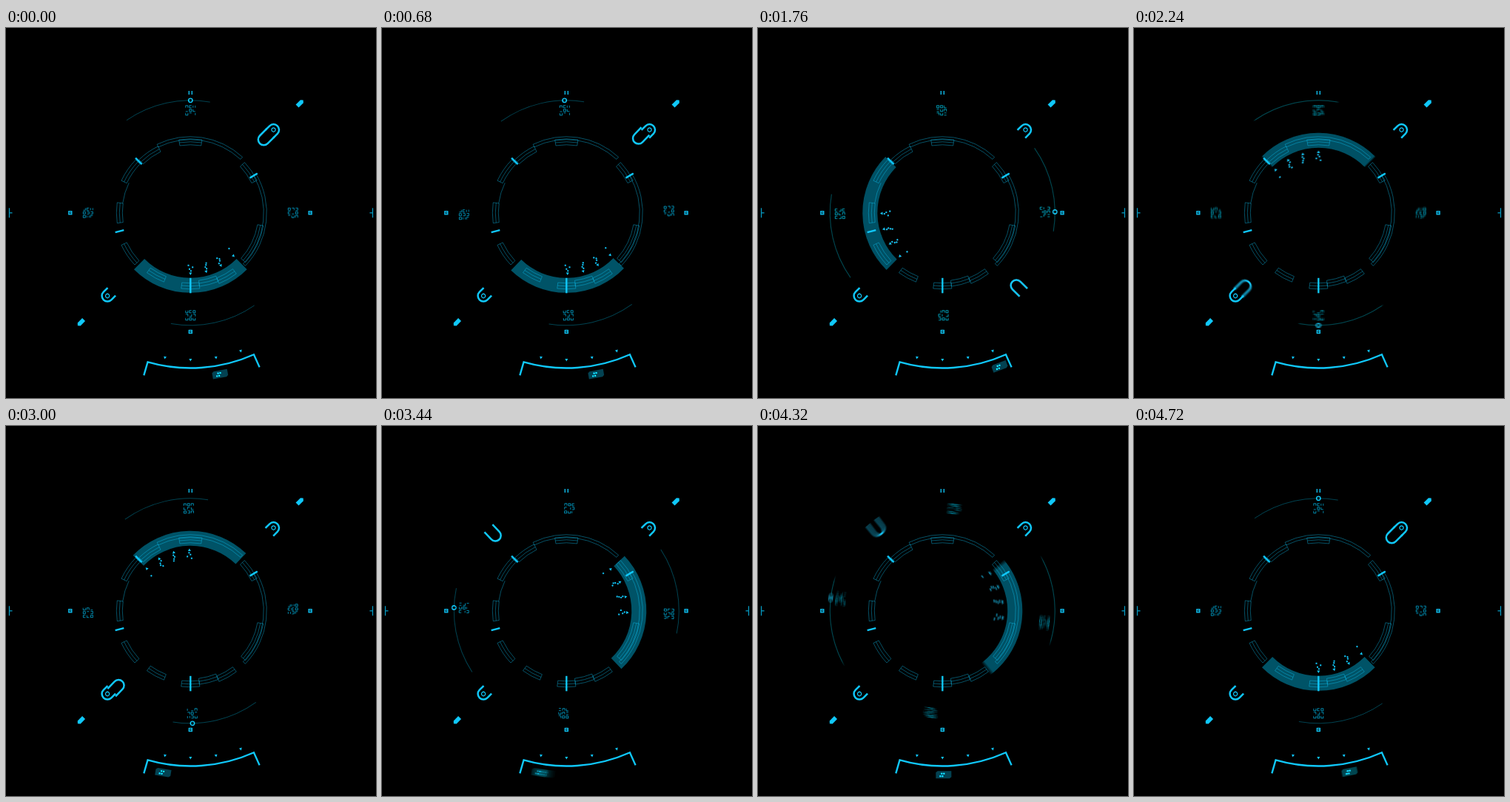
An HTML page with a canvas for the animation above (4760 ms loop, 500 by 500 pixels).

```html
<!DOCTYPE html>
<html>
<head>
<meta charset="utf-8">
<style>
  html, body { margin: 0; background: #000; overflow: hidden; }
  canvas { display: block; }
</style>
</head>
<body>
<canvas id="stage" width="500" height="500"></canvas>
<script>
const ctx = document.getElementById('stage').getContext('2d');
const LOOP = 4760, QUARTER = LOOP / 4, STEP = 40, RAD = Math.PI / 180;
const BRIGHT = '#10c8fb', TEXT = '#007d9e', PANEL = '#005367', THIN = '#00414f';

// Quadratic ease from 0 to 1 between two times
function ease(t, from, to) {
  const u = Math.min(Math.max((t - from) / (to - from), 0), 1);
  return u < 0.5 ? 2 * u * u : 1 - 2 * (1 - u) ** 2;
}

// Four quarter turns, each with a small wind-up and overshoot
const swingStarts = [715, 1905, 3055, 4245];
const dialAngle = t => swingStarts.reduce((sum, s) => sum
  - ease(t, s - 190, s - 100)
  + 92.7 * ease(t, s, s + 370)
  - 1.7 * ease(t, s + 370, s + 475), 0);

// Four stops 10 degrees apart, then back to the first
function badgeAngle(t) {
  let angle = 10.4 - (t > 2250 ? 40 : 0);
  for (let i = 0; i < 4; i++) {
    const s = QUARTER * i + 1045;
    angle += 10.7 * ease(t, s, s + 90) - 0.7 * ease(t, s + 90, s + 145);
  }
  return angle;
}

function random(seed) {
  return () => (seed = seed * 16807 % 2147483647) / 2147483647;
}

function turned(deg, draw) {
  ctx.save();
  ctx.rotate(deg * RAD);
  draw();
  ctx.restore();
}

function line(color, width, ...pts) {
  ctx.strokeStyle = color;
  ctx.lineWidth = width;
  ctx.beginPath();
  pts.forEach(([x, y]) => ctx.lineTo(x, y));
  ctx.stroke();
}

function shape(color, ...pts) {
  ctx.fillStyle = color;
  ctx.beginPath();
  pts.forEach(([x, y]) => ctx.lineTo(x, y));
  ctx.fill();
}

function arc(color, width, r, from, to, x = 0, y = 0) {
  ctx.strokeStyle = color;
  ctx.lineWidth = width;
  ctx.beginPath();
  ctx.arc(x, y, r, from * RAD, to * RAD);
  ctx.stroke();
}

function dot(x, y) {
  ctx.fillStyle = BRIGHT;
  ctx.fillRect(x - 1, y - 1, 2, 2);
}

const arrow = y => shape(BRIGHT, [-2, y - 1.5], [2, y - 1.5], [0, y + 2]);

// U shape with its round end at (0, y); the sign of arm picks the open side
function cup(y, arm) {
  ctx.strokeStyle = BRIGHT;
  ctx.lineWidth = 2.5;
  ctx.beginPath();
  ctx.moveTo(-7.5, y + arm);
  ctx.lineTo(-7.5, y);
  ctx.arc(0, y, 7.5, Math.PI, 0, arm < 0);
  ctx.lineTo(7.5, y + arm);
  ctx.stroke();
}

// 3 x 3 block of tiny broken square characters
function glyphs(seed) {
  const rnd = random(seed);
  for (let i = 0; i < 9; i++) {
    const x = (i % 3) * 5 - 6.5, y = Math.floor(i / 3) * 5 - 145;
    const corners = [[x, y], [x + 3, y], [x + 3, y + 3], [x, y + 3], [x, y]];
    for (let s = 0; s < 4; s++)
      if (rnd() < 0.66) line(TEXT, 1, corners[s], corners[s + 1]);
  }
}

// Fan of dotted columns, each ending in an arrow
function columns() {
  const rnd = random(4242);
  for (let i = 0; i < 4; i++) turned(-15 * i, () => {
    for (let j = 0; j < (i < 3 ? 4 : 1); j++) dot(rnd() * 6 - 3, 71 + 2.5 * j);
    arrow(82.3);
  });
}

function dial() {
  arc(PANEL, 20, 98, 45, 135);
  columns();
  for (const a of [55.4, 235.4]) arc(THIN, 1, 152, a, a + 44.6);
  arc(BRIGHT, 1.3, 2.7, 0, 360, 0, -152);
  for (let i = 0; i < 4; i++) turned(90 * i, () => glyphs(917 + 5381 * i));
  turned(45, () => cup(-140, -13.5));
}

function badge() {
  shape('#034252', [-10.5, -3], [-8, -5], [10.5, -5], [10.5, 3], [8, 5], [-10.5, 5]);
  for (let i = 0; i < 4; i++) dot(3 * (i % 2) - (i < 2 ? 2.5 : 4.5), i < 2 ? -1.5 : 2);
}

// Start and end angles round the ring
const sectors = [[-43, -26], [-31, 44], [10, 42], [53, 68], [68, 83], [83, 97], [111, 126],
  [137, 155], [172, 188], [205, 224], [226, 244], [244, 313], [261, 279]];

function ring() {
  ctx.globalAlpha = 0.4;
  sectors.forEach(([a, b], i) => {
    const long = b - a > 40, outer = i % 2 || long ? 103 : 100;
    const inner = outer - (long ? 4 : 8);
    ctx.strokeStyle = BRIGHT;
    ctx.lineWidth = 1;
    ctx.beginPath();
    ctx.arc(0, 0, inner, a * RAD, b * RAD);
    ctx.arc(0, 0, outer, b * RAD, a * RAD, true);
    ctx.closePath();
    ctx.stroke();
    if (!long) arc(BRIGHT, 1, (inner + outer) / 2, a, b);
  });
  arc(BRIGHT, 1, 92.5, 188, 206);
  ctx.globalAlpha = 1;
  for (const a of [-30.5, 165.5, 225]) turned(a, () => line(BRIGHT, 2.4, [93, 0], [105, 0]));
  line(BRIGHT, 2.4, [0, 88], [0, 108.5]);
}

function icon(x, y) {
  ctx.strokeStyle = BRIGHT;
  ctx.lineWidth = 1.3;
  ctx.strokeRect(x - 2, y - 2, 4, 4);
  line(BRIGHT, 1, [x - 1, y], [x + 2, y]);
}

function gauge() {
  const left = 106 * RAD, right = 65.9 * RAD;
  const polar = (r, a) => [r * Math.cos(a), r * Math.sin(a)];
  ctx.strokeStyle = BRIGHT;
  ctx.lineWidth = 2.4;
  ctx.beginPath();
  ctx.moveTo(...polar(228.5, left));
  ctx.arc(0, 0, 209.7, left, right, true);
  ctx.lineTo(...polar(228.5, right));
  ctx.stroke();
  for (let a = -10; a <= 20; a += 10) turned(-a, () => arrow(198.7));
}

function frame(t) {
  ring();
  gauge();
  for (const a of [45, 225]) turned(a, () => {
    cup(-158.7, 8);
    arc(BRIGHT, 1.2, 2.6, 0, 360, 0, -158.7);
    shape(BRIGHT, [-2.8, -204], [2.8, -204], [2.8, -213], [0, -215.5], [-2.8, -213]);
  });
  for (const x of [-2, 2]) line(BRIGHT, 1.3, [x, -164.8], [x, -159.8]);
  icon(-162.5, 0);
  icon(161.8, 0);
  icon(0, 160.7);

  const blink = t % (LOOP / 10);
  if (blink < 145 || blink > 290) for (const side of [-1, 1]) {
    const x = 245.5 * side + 0.7;
    line('#0698bf', 1.3, [x, -6.5], [x, 6.5]);
    line('#0698bf', 1.3, [x, 0], [x - side * 4, 0]);
  }
}

// Motion blur: average several poses over the shutter time
function blurred(angle, t, shutter, draw) {
  const spread = Math.abs(angle(t + shutter / 2) - angle(t - shutter / 2));
  const n = spread < 0.2 ? 1 : 10;
  ctx.globalCompositeOperation = 'lighter';
  ctx.globalAlpha = 1 / n;
  for (let i = 0; i < n; i++)
    turned(angle(t + shutter * ((i + 0.5) / n - 0.5)), draw);
  ctx.globalCompositeOperation = 'source-over';
  ctx.globalAlpha = 1;
}

function render(now) {
  const t = Math.floor(now % LOOP / STEP) * STEP;
  ctx.setTransform(1, 0, 0, 1, 0, 0);
  ctx.fillStyle = '#000';
  ctx.fillRect(0, 0, 500, 500);
  ctx.translate(249.3, 249.8);
  blurred(dialAngle, t, 16, dial);
  if (t < 2220 || t > 2300) blurred(u => -badgeAngle(u), t, 40, () => {
    ctx.translate(0, 221.5);
    badge();
  });
  frame(t);
}

const start = performance.now();
function tick() {
  render(performance.now() - start);
  requestAnimationFrame(tick);
}
tick();
</script>
</body>
</html>
```
